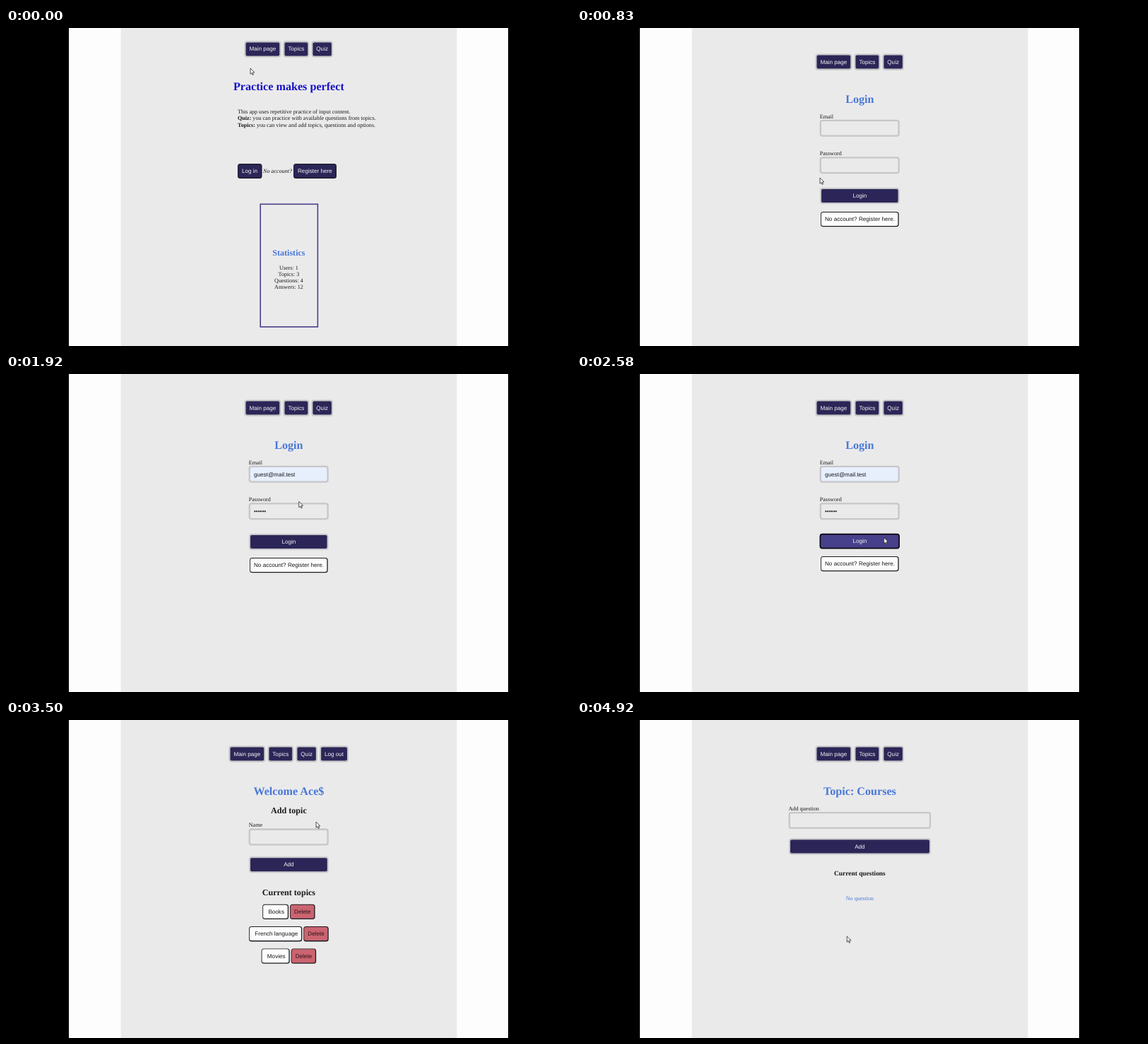
An HTML page with a canvas that plays this animation: 800x450 px, repeating every 5000 ms.

```html
<!DOCTYPE html>
<html lang="en">
<head>
<meta charset="utf-8">
<title>Practice app</title>
<style>
html, body { margin: 0; width: 100%; height: 100%; overflow: hidden; background: #000; }
canvas { display: block; width: 800px; height: 450px; }
</style>
</head>
<body>
<canvas id="stage" width="800" height="450"></canvas>
<script>
const ctx = document.getElementById('stage').getContext('2d');
const LOOP = 5000, STEPS = 60, MID = 400.4;
const SERIF = '"Liberation Serif", serif', SANS = '"Liberation Sans", sans-serif', UI = '"Open Sans", sans-serif';
const BODY = `8.1px ${SERIF}`, BOLD = `bold 8.1px ${SERIF}`, BUTTON = `8.15px ${SANS}`;
const H1 = `bold 16.15px ${SERIF}`, H2 = `bold 12.1px ${SERIF}`, H3 = `bold 9.42px ${SERIF}`;
const PAGE = '#ebeaeb', NAVY = '#2b2657', VIOLET = '#47408a', INK = '#19181b';
const BLUE = '#4878d8', GREY = '#c7c6c8', RED = '#cb6470', AUTOFILL = '#e7effd', POPUP = '#201f22';
const EMAIL = 'guest@mail.test';
const SAVED = [EMAIL, '71@k', 'lovu@ek', 'demo.u.name@vexo.test', 'lolo@pip.test', 'lovu@e.test'];

const AT = { loginHover: 6, login: 9, suggest: 14, filled: 19, submit: 29, topics: 33, alert: 34,
  alertEnd: 40, focus: 43, fade: 50, added: 54, courses: 58 };
const TYPED = [[45, 'C'], [46, 'Co'], [48, 'Cou'], [49, 'Cour'], [51, 'Cours'], [52, 'Course'], [53, 'Courses']];
const POINTER = [[0, 346, 57], [2, 346, 70], [6, 344, 204], [10, 344, 212], [13, 400, 143], [16, 410, 167],
  [21, 410, 168], [28, 434, 231], [33, 435, 232], [37, 462, 99], [40, 462, 99], [43, 431, 160],
  [54, 431, 160], [57, 383, 306], [60, 382, 306]];

function text(str, x, y, font = BODY, color = INK, align = 'left') {
  ctx.font = font;
  ctx.fillStyle = color;
  ctx.textAlign = align;
  ctx.fillText(str, x, y);
}
const centered = (str, y, font, color) => text(str, MID, y, font, color, 'center');

function widthOf(str, font = BUTTON) {
  ctx.font = font;
  return ctx.measureText(str).width;
}

function box(x, y, w, h, r, fill) {
  ctx.beginPath();
  ctx.roundRect(x, y, w, h, r);
  ctx.fillStyle = fill;
  ctx.fill();
}

function shape(points, fill) {
  ctx.beginPath();
  points.forEach(([x, y]) => ctx.lineTo(x, y));
  ctx.closePath();
  ctx.fillStyle = fill;
  ctx.fill();
}

function framed(x, y, w, h, border, fill, line = 2) {
  box(x, y, w, h, 4, border);
  box(x + line, y + line, w - 2 * line, h - 2 * line, 2, fill);
}

function outset(x, y, w, h, fill) {
  box(x, y, w, h, 3.5, '#1b1a20');
  box(x + 0.9, y + 0.9, w - 2.2, h - 2.2, 2.5, fill);
}

function wideButton(label, x, y, w) {
  framed(x, y, w, 23, GREY, NAVY);
  centered(label, y + 14.2, BUTTON, '#f4f4f6');
}

function input(x, y, w, fill = PAGE, focused = false) {
  framed(x, y, w, 24, focused ? INK : GREY, fill, focused ? 1.5 : 2.3);
}

function nav(y, items) {
  for (const [label, x] of items) {
    framed(x - 7, y - 14, widthOf(label) + 14, 23.2, GREY, NAVY, 2.1);
    text(label, x, y, BUTTON, '#f4f4f6');
  }
}
const GUEST_NAV = [['Main page', 344.4], ['Topics', 399.4], ['Quiz', 439.3]];
const USER_NAV = [['Main page', 322.4], ['Topics', 377.3], ['Quiz', 417.3], ['Log out', 451]];

function mainPage(k) {
  nav(32.3, GUEST_NAV);
  centered('Practice makes perfect', 87.5, H1, '#1712c6');
  text('This app uses repetitive practice of input content.', 328, 121.3);
  const notes = [['Quiz:', ' you can practice with available questions from topics.'],
    ['Topics:', ' you can view and add topics, questions and options.']];
  notes.forEach(([head, rest], i) => {
    const y = 130.4 + i * 9.1;
    text(head, 328, y, BOLD);
    text(rest, 328 + widthOf(head, BOLD), y);
  });
  outset(328, 192, 34.5, 21, k >= AT.loginHover ? VIOLET : NAVY);
  text('Log in', 334, 205, BUTTON, '#f4f4f6');
  text('No account?', 364, 204.8, `italic ${BODY}`);
  outset(407, 192, 61, 21, NAVY);
  text('Register here', 413, 205, BUTTON, '#f4f4f6');
  ctx.strokeStyle = VIOLET;
  ctx.lineWidth = 1.6;
  ctx.strokeRect(360.2, 249.3, 81.2, 173.6);
  centered('Statistics', 322, H2, BLUE);
  ['Users: 1', 'Topics: 3', 'Questions: 4', 'Answers: 12'].forEach((s, i) => centered(s, 342 + i * 9.1, BODY));
}

function emailPopup() {
  shape([[395, 159.5], [400.3, 154], [405.5, 159.5]], POPUP);
  box(390, 158.8, 90.5, 112.4, 3, POPUP);
  box(390.5, 161, 89.5, 17.5, 0, '#39383b');
  SAVED.forEach((s, i) => text(s, 396, 171.8 + i * 18.15, `600 6.3px ${UI}`, '#e6e6e8'));
  ctx.strokeStyle = '#d8d8da';
  ctx.lineWidth = 0.8;
  ctx.beginPath();
  ctx.moveTo(467.4, 167.3); ctx.lineTo(471.6, 171.5);
  ctx.moveTo(471.6, 167.3); ctx.lineTo(467.4, 171.5);
  ctx.stroke();
}

function loginPage(k) {
  const choosing = k >= AT.suggest && k < AT.filled, filled = k >= AT.filled, sent = k >= AT.submit;
  nav(50.5, GUEST_NAV);
  centered('Login', 105.8, H1, BLUE);
  text('Email', 343.7, 127.6);
  input(343.6, 129.8, 113.2, choosing || filled ? AUTOFILL : PAGE, choosing);
  if (choosing) text(EMAIL, 351, 144.2, `6.4px ${UI}`);
  if (filled) text(EMAIL, 351, 144.6, BUTTON);
  text('Password', 343.7, 180);
  input(343.6, 182.3, 113.2);
  if (filled) text('••••••', 351, 196.8, BUTTON);
  if (sent) {
    framed(343.5, 225.7, 113.5, 21.8, '#08070c', VIOLET, 1.7);
    centered('Login', 239.3, BUTTON, '#f4f4f6');
  } else {
    wideButton('Login', 344, 226, 112.6);
  }
  const y = sent ? 258 : 260;
  outset(345, y, 110.7, 21.2, '#fefdfe');
  text('No account? Register here.', 351, y + 13, BUTTON);
  if (choosing) emailPopup();
}

function topicRow(name, y) {
  const nameW = widthOf(name) + 14.3, deleteW = widthOf('Delete') + 12;
  const x = MID - (nameW + deleteW + 2) / 2;
  outset(x, y, nameW, 21.3, '#fefdfe');
  text(name, x + 8.2, y + 13.1, BUTTON);
  outset(x + nameW + 2, y, deleteW, 21.3, RED);
  text('Delete', x + nameW + 8, y + 13.1, BUTTON, '#2a1519');
}

function topicPopup(alpha) {
  ctx.globalAlpha = alpha;
  shape([[396, 183], [401, 178.5], [406, 183]], POPUP);
  box(391, 183, 76, 21, 3, POPUP);
  text('Countries', 397, 195.4, `600 6.3px ${UI}`, '#f0f0f0');
  ctx.globalAlpha = 1;
}

function passwordAlert() {
  ctx.save();
  ctx.shadowColor = 'rgba(0,0,0,.45)';
  ctx.shadowBlur = 4;
  box(264.3, -10, 226.8, 134.7, 5, '#1f1e20');
  ctx.restore();
  box(264.3, -1, 226.8, 28, 0, '#262527');
  ctx.strokeStyle = '#464547';
  ctx.lineWidth = 3;
  ctx.beginPath();
  ctx.moveTo(264, 8);
  ctx.bezierCurveTo(276, 2, 282, 12, 290, 16);
  ctx.bezierCurveTo(298, 20, 302, 10, 312, 17);
  ctx.stroke();
  ctx.beginPath();
  ctx.arc(292, -1, 4, 0, Math.PI);
  ctx.stroke();
  box(350, -4, 49, 25, 2, '#3d3c3f');
  box(351, -4, 43, 23, 1, '#28272a');
  box(321, -4, 36, 31.5, 2, '#39383b');
  shape([[327, 14], [339.5, -7], [352, 14]], '#e57b82');
  text('!', 339.5, 10.5, `bold 11px ${SANS}`, '#3a2326', 'center');
  text('***|', 350.5, 11.8, `bold 10px "Liberation Mono", monospace`, '#a9bdf0');
  box(471, 2.5, 9, 4.5, 2.2, '#484749');
  box(473, 0.5, 5, 5, 2.5, '#484749');
  text('Change your password', 275, 51.4, `600 7.5px ${UI}`, '#ececee');
  const small = `5.75px ${UI}`;
  text('The password you just used was found in a data breach. Zimvex Password', 275, 70, small, '#c9c8ca');
  text('Manager recommends changing your password now.', 275, 80, small, '#c9c8ca');
  ctx.strokeStyle = '#cfced0';
  ctx.lineWidth = 0.8;
  ctx.beginPath();
  ctx.arc(281, 104.5, 3.1, 0, 7);
  ctx.stroke();
  text('i', 281, 106.4, `bold 5px ${SANS}`, '#cfced0', 'center');
  box(446.2, 92.8, 37, 23.4, 11.7, '#b5c6f1');
  box(447.5, 94.1, 34.4, 20.8, 10.4, '#1f1e20');
  box(448.8, 95.4, 31.8, 18.2, 9.1, '#a9bbe9');
  text('OK', 464.7, 106.7, `600 6.3px ${UI}`, '#25355c', 'center');
}

function topicsPage(k) {
  const added = k >= AT.added, focused = k >= AT.focus && !added;
  nav(50.5, USER_NAV);
  centered('Welcome Ace$', 105.8, H1, BLUE);
  centered('Add topic', 131.6, H2);
  text('Name', 343.7, 151.4);
  input(343.6, 153.6, 113.2, focused ? '#d7d5d8' : PAGE, focused);
  if (focused) {
    const typed = TYPED.filter(([step]) => step <= k).pop()?.[1] ?? '';
    text(typed, 351, 168.3, BUTTON);
    box(351.3 + widthOf(typed), 161.5, 0.7, 8.5, 0, INK);
  }
  wideButton('Add', 344, 193.2, 112.8);
  centered('Current topics', 248, H2);
  const names = ['Books', 'French language', 'Movies'];
  if (added) names.splice(1, 0, 'Courses');
  names.forEach((name, i) => topicRow(name, 260.8 + i * 31.3));
  if (k >= TYPED[0][0] && k <= AT.fade) topicPopup(k < AT.fade ? 1 : 0.27);
  if (k >= AT.alert && k < AT.alertEnd) passwordAlert();
}

function coursePage() {
  nav(50.5, GUEST_NAV);
  centered('Topic: Courses', 105.8, H1, BLUE);
  text('Add question', 299.5, 127.6);
  input(299.5, 130, 201.7);
  wideButton('Add', 300, 167.5, 201);
  centered('Current questions', 219.6, H3);
  centered('No question', 254.5, BODY, BLUE);
}

function pointer(k) {
  const i = POINTER.findIndex(([step]) => step > k);
  const [k0, x0, y0] = POINTER[i - 1], [k1, x1, y1] = POINTER[i];
  const p = (k - k0) / (k1 - k0), e = p * p * (3 - 2 * p);
  const x = x0 + (x1 - x0) * e, y = y0 + (y1 - y0) * e;
  ctx.lineWidth = 0.8;
  ctx.strokeStyle = '#242326';
  if (k >= AT.focus && k < AT.added) {
    ctx.beginPath();
    for (const dy of [-4, 4]) { ctx.moveTo(x - 1.8, y + dy); ctx.lineTo(x + 1.8, y + dy); }
    ctx.moveTo(x, y - 4); ctx.lineTo(x, y + 4);
    ctx.stroke();
    return;
  }
  const arrow = [[0, 0], [0, 8.2], [1.9, 6.5], [3.2, 9.4], [4.5, 8.8], [3.3, 6], [5.8, 5.8]];
  shape(arrow.map(([dx, dy]) => [x + dx, y + dy]), '#fff');
  ctx.stroke();
}

function draw(now) {
  const k = Math.floor(((now % LOOP) + 5) * STEPS / LOOP) % STEPS;
  ctx.textRendering = 'geometricPrecision';
  box(0, 0, 800, 450, 0, '#000');
  box(89, 0, 622, 450, 0, '#fefdfe');
  box(162.6, 0, 475.8, 450, 0, PAGE);
  if (k < AT.login) mainPage(k);
  else if (k < AT.topics) loginPage(k);
  else if (k < AT.courses) topicsPage(k);
  else coursePage();
  pointer(k);
}

let start;
function tick(now) {
  start ??= now;
  draw(now - start);
  requestAnimationFrame(tick);
}
draw(0);
requestAnimationFrame(tick);
</script>
</body>
</html>
```
